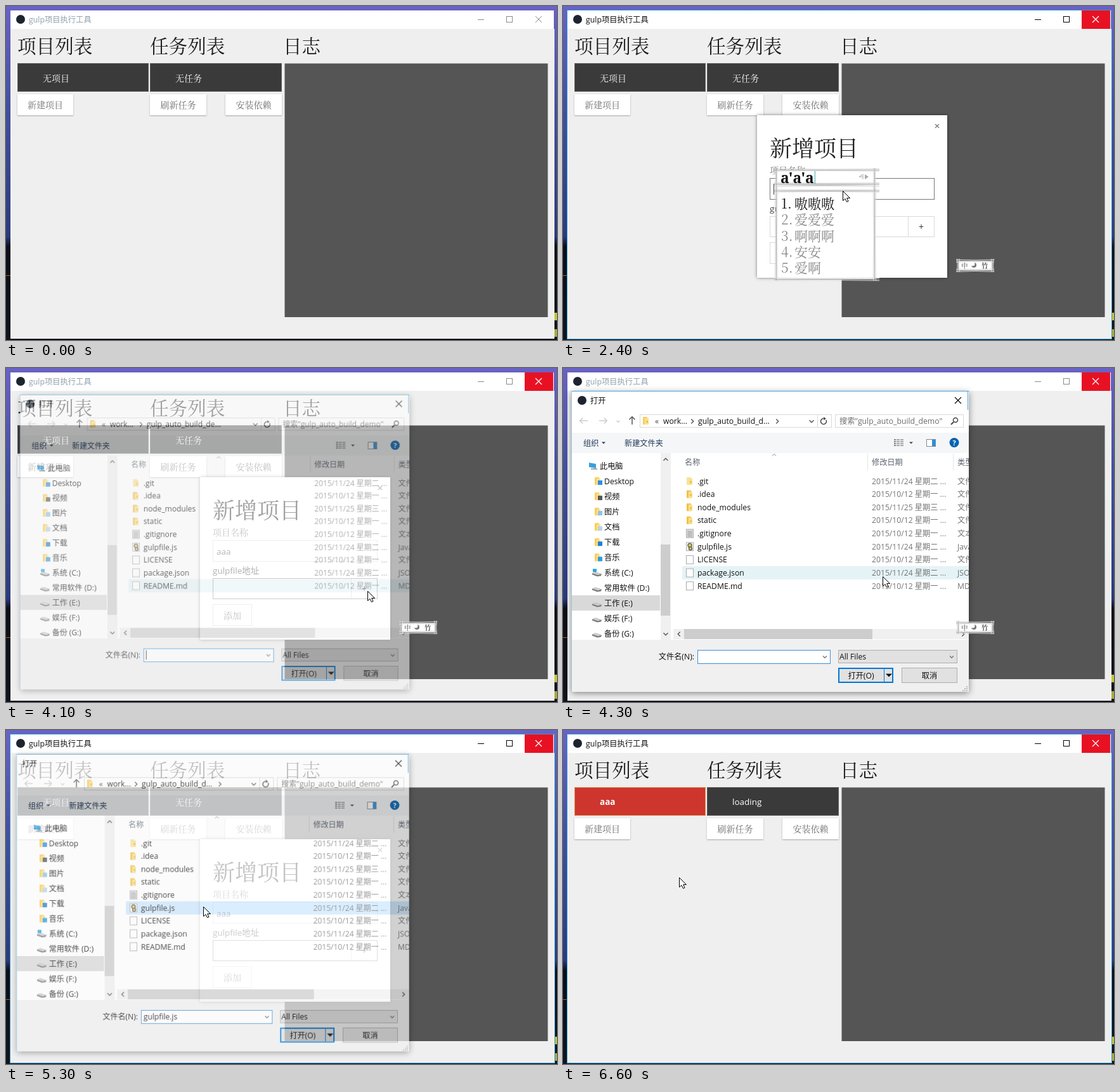
These frames come from a looping animation (869 by 526 pixels, 8 s). An HTML page with a canvas:

```html
<!DOCTYPE html>
<html lang="zh-CN">
<head>
<meta charset="utf-8">
<style>
html, body { margin: 0; width: 100%; height: 100%; overflow: hidden; background: #efefef; }
canvas { display: block; }
</style>
</head>
<body>
<canvas id="stage" width="869" height="526"></canvas>
<script>
const LOOP = 8000;
const SANS = '"Open Sans", "Noto Sans CJK SC", "Noto Sans CJK", sans-serif';
const SERIF = '"Noto Serif CJK SC", "Noto Sans CJK SC", "Noto Sans CJK", serif';
const stage = document.getElementById('stage').getContext('2d');
const dialogLayer = document.createElement('canvas');
dialogLayer.width = 869;
dialogLayer.height = 526;
let g = stage; // context that the helpers draw on

// ---------- helpers ----------
function rect(x, y, w, h, fill, stroke) {
  if (fill) { g.fillStyle = fill; g.fillRect(x, y, w, h); }
  if (stroke) {
    g.lineWidth = 1;
    g.strokeStyle = stroke;
    g.strokeRect(x + .5, y + .5, w - 1, h - 1);
  }
}

function shadowRect(x, y, w, h, fill, blur, color, dy = 0) {
  g.save();
  g.shadowBlur = blur;
  g.shadowColor = color;
  g.shadowOffsetY = dy;
  rect(x, y, w, h, fill);
  g.restore();
}

// y is the vertical middle of the line
function text(s, x, y, size, color, { font = SANS, weight = 400, align = 'left' } = {}) {
  g.font = `${weight} ${size}px ${font}`;
  g.textAlign = align;
  g.fillStyle = color;
  g.fillText(s, x, y + size * .37);
}

function path(points, { stroke, fill, width = 1, close = false }) {
  g.beginPath();
  points.forEach(([x, y]) => g.lineTo(x, y));
  if (close) g.closePath();
  if (fill) { g.fillStyle = fill; g.fill(); }
  if (stroke) { g.strokeStyle = stroke; g.lineWidth = width; g.stroke(); }
}

function circle(x, y, r, fill, stroke) {
  g.beginPath();
  g.arc(x, y, r, 0, 7);
  if (fill) { g.fillStyle = fill; g.fill(); }
  if (stroke) { g.strokeStyle = stroke; g.lineWidth = 1.5; g.stroke(); }
}

function cross(x, y, r, color, width = 1) {
  path([[x - r, y - r], [x + r, y + r]], { stroke: color, width });
  path([[x + r, y - r], [x - r, y + r]], { stroke: color, width });
}

// dx, dy: the direction the chevron points to
function chevron(x, y, dx, dy, color = '#555', r = 3.5, width = 1.4) {
  const p = s => [x - dx * r / 2 + s * dy * r, y - dy * r / 2 + s * dx * r];
  path([p(-1), [x + dx * r / 2, y + dy * r / 2], p(1)], { stroke: color, width });
}

function arrow(x, y, dx, dy, color) {
  path([[x - dx * 6, y - dy * 6], [x + dx * 6, y + dy * 6]], { stroke: color, width: 1.5 });
  chevron(x + dx * 4, y + dy * 4, dx, dy, color, 4.5, 1.5);
}

function caretDown(x, y, r, color) {
  path([[x - r, y - r / 2], [x + r, y - r / 2], [x, y + r / 2]], { fill: color });
}

// ---------- main window ----------
function desktop() {
  const sky = g.createLinearGradient(0, 0, 0, 526);
  [[0, '#6a62c4'], [.3, '#43509f'], [.69, '#2b3a7c'], [.72, '#0b0e18'], [1, '#11141c']]
    .forEach(([at, color]) => sky.addColorStop(at, color));
  rect(0, 0, 869, 526, sky);
  rect(0, 424, 7, 1, '#a5622a');
  rect(865, 483, 4, 12, '#c3c43a');
  rect(865, 509, 4, 12, '#a9ad38');
}

function button(label, x, y, w, h, focused) {
  shadowRect(x, y, w, h, '#fff', 2, 'rgba(0,0,0,.3)', 1);
  if (focused) rect(x, y, w, h, null, '#777');
  text(label, x + w / 2, y + h / 2 + .5, 14, '#6c6c6c', { font: SERIF, align: 'center' });
}

function mainWindow(t) {
  const active = t >= 700 && t < 3700 || t >= 5300;
  const hot = t >= 200;
  const ink = active ? '#000' : '#8a8a8a';
  if (active) rect(6, 6, 860, 519, null, '#2f9bd0');
  rect(7, 7, 857, 30, '#fff');
  rect(7, 36, 858, 488, '#efefef');
  circle(23, 21, 7, '#1d2430');
  text('gulp项目执行工具', 36, 21, 12.3, active ? '#111' : '#8fa0ac');
  rect(744, 21, 10, 1, ink);
  rect(789, 16, 10, 10, null, ink);
  if (hot) rect(818, 7, 45, 29, '#e81123');
  cross(840, 21, 5, hot ? '#fff' : ink, hot ? 1.3 : 1);

  [['项目列表', 18], ['任务列表', 227], ['日志', 437]].forEach(([s, x]) =>
    text(s, x, 63, 29.6, '#1d1d1d', { font: SERIF, weight: 200 }));
  const added = t >= 5900;
  rect(18, 90, 207, 45, added ? '#ce352c' : '#3a3a3a', added ? '#d98a50' : '#606060');
  rect(227, 90, 208, 45, '#3a3a3a', '#606060');
  if (added) {
    text('aaa', 58, 113, 13.5, '#fff', { weight: 700 });
    text('loading', 267, 113, 13.5, '#fff');
  } else {
    text('无项目', 58, 113.5, 14, '#fff', { font: SERIF });
    text('无任务', 267, 113.5, 14, '#fff', { font: SERIF });
  }
  rect(439.5, 90.5, 415, 399.5, '#555');
  button('新建项目', 18, 139, 88, 33, t >= 700 && t < 1600);
  button('刷新任务', 227, 139, 89, 33);
  button('安装依赖', 346, 139, 89, 33);
}

function modal(t) {
  const nameFocus = t >= 1600 && t < 3500;
  const pathFocus = t >= 3500 && t < 5800;
  shadowRect(306, 172, 300, 256, '#fff', 5, 'rgba(0,0,0,.5)');
  cross(590, 189, 3, '#777', 1.3);
  text('新增项目', 326, 224, 35, '#222', { font: SERIF, weight: 200 });
  text('项目名称', 326, 259, 14, '#777', { font: SERIF });
  rect(326, 271, 260, 34, '#fff', nameFocus ? '#777' : '#d9d9d9');
  if (t >= 2800) text('aaa', 332, 289, 13.5, '#555');
  else if (nameFocus) rect(332, 280, 1, 17, '#444');
  text('gulpfile地址', 326, 319, 13.5, '#444');
  rect(326, 331, 260, 33, '#fff', pathFocus ? '#888' : '#d9d9d9');
  rect(544, 332, 1, 31, '#d9d9d9');
  text('+', 565, 348, 14, '#333', { align: 'center' });
  if (t >= 5400) {
    g.save();
    g.beginPath();
    g.rect(327, 332, 215, 31);
    g.clip();
    text('E:\\work\\gulp_auto_build_demo\\gulpfile.js', 332, 348, 13.5, '#555');
    g.restore();
  }
  rect(326, 372, 62, 34, '#fff', t >= 5800 ? '#777' : '#d9d9d9');
  text('添加', 343, 389.5, 14, '#6c6c6c', { font: SERIF });
}

// ---------- input method ----------
function sketchBox(x, y, w, h, over = 8) {
  rect(x, y, w, h, '#fff');
  for (const [d, color] of [[.5, '#a5a5a5'], [2.5, '#dcdcdc'], [-1.5, '#d2d2d2']]) {
    for (const yy of [y, y + h]) path([[x - 3, yy + d], [x + w / 2, yy + d * .6], [x + w + over, yy + d]], { stroke: color });
    for (const xx of [x, x + w]) path([[xx + d, y - 3], [xx + d * .6, y + h / 2], [xx + d, y + h + 3]], { stroke: color });
  }
}

function candidates(t) {
  const wide = t >= 2400;
  const w = wide ? 155 : 135;
  const [typed, words] = t < 2000 ? ['a', '啊 阿 呵 吖 嗄']
    : wide ? ["a'a'a", '嗷嗷嗷 爱爱爱 啊啊啊 安安 爱啊']
    : ["a'a", '啊啊 爱啊 安安 爱爱 啊'];
  sketchBox(336, 282, w, 9);
  sketchBox(336, 258, w, 22);
  sketchBox(336, 291, w, 139);
  text(typed, 343, 270, 23, '#111', { font: '"Noto Serif", serif', weight: 700 });
  rect(344 + g.measureText(typed).width, 260, 1, 20, '#3aa');
  const x = 336 + w;
  path([[x - 18, 269], [x - 24, 269], [x - 18, 265], [x - 18, 273]], { stroke: '#aaa' });
  path([[x - 15, 265], [x - 9, 269], [x - 15, 273]], { fill: '#aaa' });
  words.split(' ').forEach((word, i) => {
    const y = 311 + i * 25.4, color = i ? '#888' : '#111';
    text(i + 1 + '.', 344, y, 21, color, { font: SERIF });
    text(word, 365, y, 21, color, { font: SERIF, weight: 300 });
  });
}

function imeBar() {
  sketchBox(623, 401, 54, 15, 2);
  text('中', 628, 409, 10.5, '#444', { font: SERIF });
  circle(648, 408, 4, '#777');
  circle(646, 406, 3.5, '#fff');
  text('竹', 660, 409, 10.5, '#555', { font: SERIF, weight: 700 });
}

// ---------- file dialog ----------
const PLACES = ['此电脑', 'Desktop', '视频', '图片', '文档', '下载', '音乐',
  '系统 (C:)', '常用软件 (D:)', '工作 (E:)', '娱乐 (F:)', '备份 (G:)'];
const FILES = [
  ['.git', '11/24 星期二', '文件夹'], ['.idea', '10/12 星期一', '文件夹'],
  ['node_modules', '11/25 星期三', '文件夹'], ['static', '10/12 星期一', '文件夹'],
  ['.gitignore', '10/12 星期一', '文本文档'], ['gulpfile.js', '11/24 星期二', 'JavaScript'],
  ['LICENSE', '10/12 星期一', '文件'], ['package.json', '11/24 星期二', 'JSON'],
  ['README.md', '10/12 星期一', 'MD']];
const ROW = 20.65;

function folder(x, y, color = '#f7cf5c') {
  rect(x, y - 6, 7, 12, color);
  rect(x + 3, y - 4, 6, 10, '#fbe08a');
  rect(x + 5, y, 3, 3, '#ecc050');
}

function placeIcon(i, y) {
  if (i === 0) {
    path([[41, y - 5], [52, y - 3], [52, y + 4], [41, y + 2]], { fill: '#3b9fdc', close: true });
    rect(44, y + 4, 10, 2, '#9aa');
  } else if (i < 7) {
    folder(50, y);
    rect(55, y - 1, 7, 7, ['#2b8fe0', '#555', '#8cc4e8', '#b9d3e6', '#1f7fd6', '#2b9be6'][i - 1]);
  } else {
    path([[46, y + 1], [51, y - 1], [61, y + 2], [60, y + 5], [54, y + 6], [46, y + 3]], { fill: '#777', close: true });
    path([[46, y + 1], [51, y - 1], [61, y + 2], [55, y + 4]], { fill: '#ccc', close: true });
    if (i === 7) rect(47, y - 6, 6, 5, '#2aa3e0');
  }
}

function fileIcon(i, y) {
  if (i < 4) return folder(195, y, i ? '#f3c04a' : '#f5e3a2');
  rect(194, y - 7, 12, 14, i === 4 ? '#e4e4e4' : '#fff', '#aaa');
  if (i === 4) for (let k = -4; k < 5; k += 2) rect(196, y + k, 8, 1, '#999');
  if (i === 5) {
    circle(200, y - 2, 3, '#d8cc50', '#666');
    circle(201, y + 3, 2.5, '#d8cc50', '#666');
  }
}

function dialog(t, [cx, cy]) {
  const opening = t < 4200, chosen = t >= 5000, closing = t >= 5300;
  const label = (s, x, y, color = '#111', align) => text(s, x, y, 12.2, color, { align });
  g.clearRect(0, 0, 869, 526);
  shadowRect(14, 37, 626, 473, '#fff', 10, 'rgba(0,0,0,.45)', 2);
  g.save();
  g.beginPath();
  g.rect(13, 36, 627, 475);
  g.clip();

  // title and address
  if (!closing) circle(30, 51, 7, '#1d2430');
  label('打开', closing ? 22 : 43, 51);
  cross(623, 51, 5, '#111', 1.2);
  arrow(33, 83, -1, 0, '#ccc');
  arrow(63, 83, 1, 0, '#ccc');
  chevron(87, 84, 0, 1, '#ccc', 2.5);
  arrow(109, 83, 0, -1, '#555');
  rect(121, 73, 303, 21, '#fff', '#d9d9d9');
  rect(401, 73, 1, 21, '#d9d9d9');
  folder(126, 83);
  label('«', 145, 83, '#444');
  label('work...', 158, 83);
  const shift = opening ? 4 : 0;
  chevron(204 + shift, 84, 1, 0);
  label(opening ? 'gulp_auto_build_de...' : 'gulp_auto_build_d...', 213 + shift, 83);
  if (!opening) chevron(338, 84, 1, 0);
  chevron(392, 84, 0, 1);
  g.beginPath();
  g.arc(411, 84, 4.5, -.5, 4.6);
  g.strokeStyle = '#444';
  g.lineWidth = 1.5;
  g.stroke();
  path([[411, 77], [415, 80], [411, 82]], { fill: '#444' });
  rect(429, 73, 203, 21, '#fff', '#d9d9d9');
  label('搜索"gulp_auto_build_demo"', 436, 83, '#6d6d6d');
  circle(619, 82, 3.5, null, '#444');
  path([[616, 85], [612, 89]], { stroke: '#444', width: 2 });

  // toolbar
  rect(14, 102, 626, 32, '#f5f6f7');
  label('组织', 32, 118, '#1e395b');
  caretDown(64, 118, 3, '#1e395b');
  label('新建文件夹', 97, 118, '#1e395b');
  for (let k = 0; k < 4; k++) {
    rect(522, 112 + k * 3, 3, 2, '#888');
    rect(526, 112 + k * 3, 5, 2, '#aaa');
    rect(532, 112 + k * 3, 5, 2, '#aaa');
  }
  caretDown(549, 118, 3, '#444');
  rect(573, 112, 15, 12, '#fff', '#7a8a9a');
  rect(582, 113, 5, 10, '#2f8fd8');
  circle(617, 117.5, 7.5, '#0063b1');
  text('?', 617, 117.5, 11, '#fff', { weight: 700, align: 'center' });

  // places
  rect(14, 358, 139, 24, '#d9d9d9');
  PLACES.forEach((name, i) => {
    const y = 154 + i * 24.05;
    placeIcon(i, y);
    label(name, i ? 65 : 58, y);
  });
  rect(154, 134, 16, 294, '#f0f0f0');
  rect(154, 278, 15, 112, '#cdcdcd');
  chevron(162, 144, 0, -1);
  chevron(162, 419, 0, 1);

  // files
  chevron(333, 137, 0, -1, '#888', 3, 1);
  rect(480, 135, 1, 26, '#e5e5e5');
  rect(615, 135, 1, 26, '#e5e5e5');
  label('名称', 192, 148, '#5c6470');
  label('修改日期', 487, 148, '#5c6470');
  label('类型', 622, 148, '#5c6470');
  const hover = cx > 188 && cx < 640 ? Math.floor((cy - 167.5) / ROW) : -1;
  FILES.forEach(([name, date, kind], i) => {
    const y = 178 + i * ROW;
    if (chosen && i === 5) rect(188, y - 10.5, 452, 21, '#cce8ff');
    else if (i === hover) rect(188, y - 10.5, 452, 21, '#e5f3f7');
    fileIcon(i, y);
    label(name, 212, y);
    label(`2015/${date} ...`, 487, y, '#757575');
    label(kind, 622, y, '#757575');
  });
  rect(174, 411, 466, 16, '#f0f0f0');
  rect(191, 411, 297, 16, '#cdcdcd');
  chevron(183, 419, -1, 0);
  chevron(631, 419, 1, 0);

  // footer
  rect(14, 428, 626, 82, '#f0f0f0');
  label('文件名(N):', 207, 454, '#111', 'right');
  rect(212, 444, 210, 22, '#fff', '#3c8fd4');
  chevron(413, 455, 0, 1, '#777', 3);
  if (chosen) label('gulpfile.js', 216, 454);
  else if (opening) rect(216, 447, 1, 15, '#111');
  rect(434, 444, 188, 21, '#e1e1e1', '#adadad');
  label('All Files', 436, 454);
  chevron(613, 455, 0, 1, '#777', 3);
  rect(434, 472, 87, 24, '#e1e1e1', '#0078d7');
  rect(435, 473, 85, 22, null, '#0078d7');
  rect(506, 473, 1, 22, '#0078d7');
  label('打开(O)', 470, 484, '#111', 'center');
  caretDown(514, 484, 5, '#111');
  rect(534, 472, 88, 24, '#e1e1e1', '#adadad');
  label('取消', 578, 484, '#111', 'center');
  for (let k = 0; k < 3; k++)
    for (let j = 0; j <= k; j++) rect(636 - j * 3, 501 + k * 3, 2, 2, '#bbb');
  g.restore();
  rect(13, 36, 627, 1, '#45a5d8');
  rect(13, 36, 1, 474, '#9cc9e0');
  rect(638, 36, 1, 30, '#45a5d8');
}

function showDialog(t, cursor) {
  g = dialogLayer.getContext('2d');
  dialog(t, cursor);
  g = stage;
  const [alpha, scale, dx, dy] = t < 4200 ? [.58, .98, 2.5, 1]
    : t >= 5300 ? [.73, .988, -.5, -1] : [1, 1, 0, 0];
  g.save();
  g.globalAlpha = alpha;
  g.translate(327 + dx, 273.5 + dy);
  g.scale(scale, scale);
  g.drawImage(dialogLayer, -327, -273.5);
  g.restore();
}

// ---------- pointer ----------
const MOVES = [[200, 845, 12], [600, 62, 149], [1000, 62, 149], [1600, 441, 291],
  [3200, 441, 291], [3500, 566, 345], [3600, 566, 345], [3900, 570, 351], [4100, 570, 351],
  [4700, 315, 263], [4900, 311, 278], [5300, 311, 278], [5800, 356, 384], [6600, 183, 232], [LOOP, 183, 232]];
const ARROW = [[0, 0], [0, 15], [3.5, 12], [6, 17], [8.5, 16], [6.2, 11], [11, 11]];
const HAND = [[-2, 0], [1, 0], [1, 6], [6, 7], [8, 9], [8, 13], [6, 18], [-2, 18], [-8, 10], [-6, 8], [-2, 11]];

function pointerAt(t) {
  const i = MOVES.findIndex(m => m[0] > t);
  const [t0, x0, y0] = MOVES[i - 1], [t1, x1, y1] = MOVES[i];
  const p = (t - t0) / (t1 - t0), e = p * p * (3 - 2 * p);
  return [x0 + (x1 - x0) * e, y0 + (y1 - y0) * e];
}

function pointer(t, [x, y]) {
  const hand = t >= 600 && t < 1100 || t >= 3500 && t < 4000 || t >= 5800 && t < 5900;
  path((hand ? HAND : ARROW).map(([dx, dy]) => [Math.round(x) + dx + .5, Math.round(y) + dy + .5]),
    { fill: '#fff', stroke: '#000', close: true });
}

function draw(t) {
  const cursor = t >= 200 ? pointerAt(t) : [-99, -99];
  desktop();
  mainWindow(t);
  if (t >= 800 && t < 5900) {
    g.globalAlpha = t < 900 ? .5 : 1;
    modal(t);
    g.globalAlpha = 1;
  }
  if (t >= 1900 && t < 2800) candidates(t);
  if (t >= 4100 && t < 5400) showDialog(t, cursor);
  if (t >= 1600 && t < 5300) imeBar();
  pointer(t, cursor);
}

function tick() {
  draw(Math.floor(performance.now() % LOOP / 100) * 100);
  requestAnimationFrame(tick);
}
tick();
</script>
</body>
</html>
```
